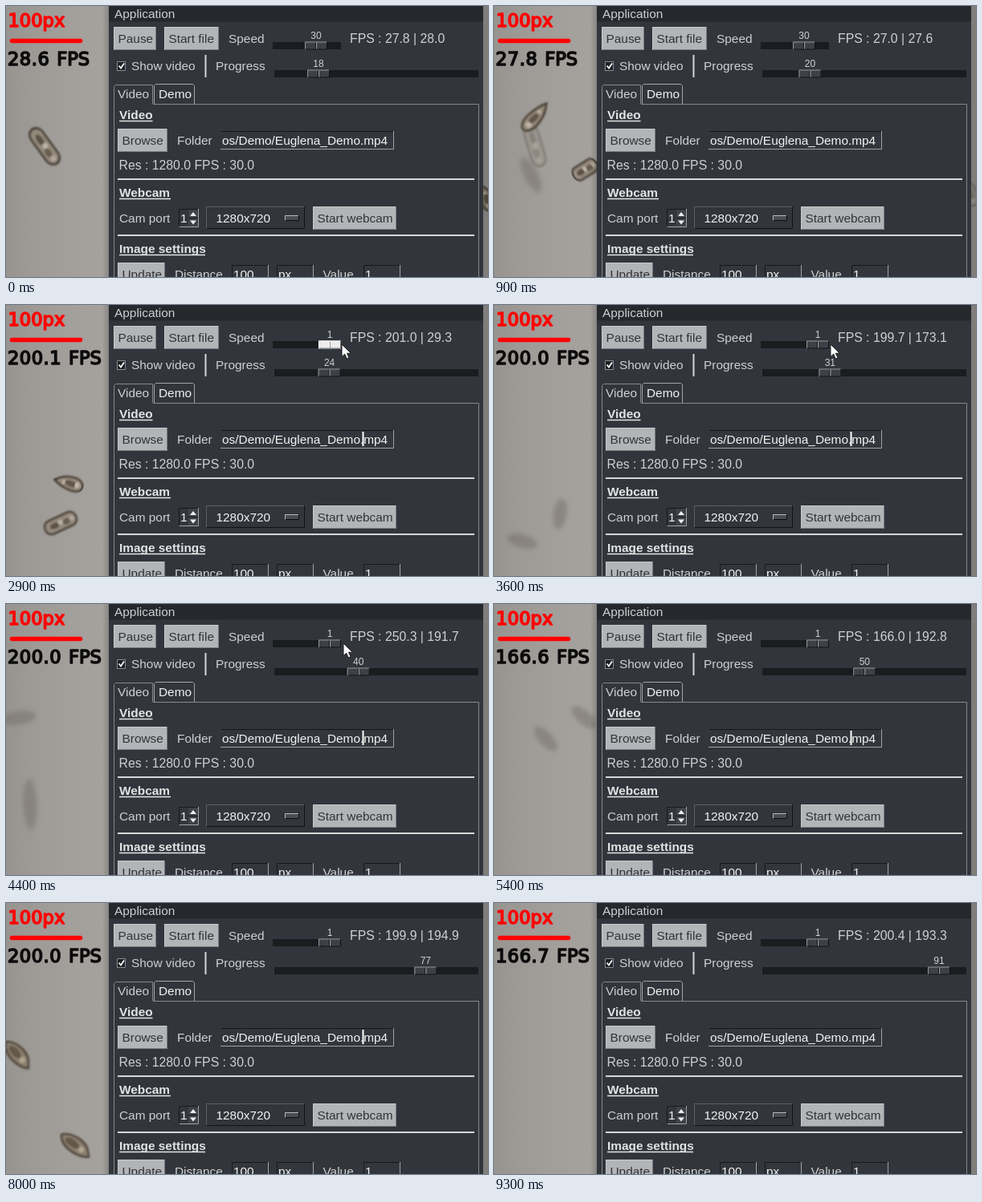
Recreate the animation shown at these times as an HTML page. Size 600 by 338 pixels, loop 9400 ms.

```html
<!DOCTYPE html>
<html lang="en">
<head>
<meta charset="utf-8">
<title>Video control panel</title>
<style>
html, body { margin: 0; width: 100%; height: 100%; overflow: hidden; background: #a09c98; }
svg { display: block; width: 100vw; height: 100vh; }
text { font: 15.4px "Liberation Sans", Arial, sans-serif; fill: #cfd0d2; white-space: pre; }
.head { font-weight: bold; fill: #e2e3e4; }
.dark { fill: #303338; }
.lit { fill: #f2f2f2; }
.num { font-size: 15.8px; }
.small { font-size: 12px; text-anchor: middle; }
.over { font: 22.6px "DejaVu Sans", sans-serif; fill: #0c0c0c; stroke: #0c0c0c; stroke-width: 1.6; stroke-linejoin: round; }
.red { fill: #f00; stroke: #f00; }
#rate { letter-spacing: .5px; }
</style>
</head>
<body>
<svg viewBox="0 0 600 338" preserveAspectRatio="none" xmlns="http://www.w3.org/2000/svg">
  <defs>
    <filter id="b1" x="-30%" y="-50%" width="160%" height="200%"><feGaussianBlur stdDeviation="1"/></filter>
    <filter id="b2" x="-50%" y="-80%" width="200%" height="260%"><feGaussianBlur stdDeviation="3"/></filter>
    <linearGradient id="edge"><stop offset="0" stop-opacity="0"/><stop offset="1" stop-opacity=".18"/></linearGradient>
    <linearGradient id="vig"><stop offset="0" stop-color="#565452" stop-opacity=".12"/><stop offset="1" stop-color="#fff" stop-opacity=".05"/></linearGradient>
    <clipPath id="entry"><rect x="268" y="156" width="214" height="21"/></clipPath>
    <g id="rod" filter="url(#b1)">
      <rect x="-25" y="-9" width="50" height="18" rx="9" fill="#94897a" stroke="#3f382f" stroke-width="3"/>
      <ellipse cx="-9" rx="8" ry="4" fill="#554b3f"/><ellipse cx="9" cy="1" rx="6" ry="4" fill="#62584a"/>
      <circle cy="-1" r="3.5" fill="#beb5a8"/><circle cx="18" r="3.5" fill="#b5aa9b"/>
    </g>
    <g id="drop" filter="url(#b1)">
      <path d="M-25 2C-18-3-8-9 8-9C20-9 26-4 25 1C23 7 12 9 2 8C-9 7-18 5-25 2Z" fill="#978b79" stroke="#40382e" stroke-width="3"/>
      <ellipse cx="4" rx="11" ry="4" fill="#5a5043"/><circle cx="15" cy="-1" r="4" fill="#c2b8aa"/><circle cx="-9" cy="1" r="3" fill="#b9ae9e"/>
    </g>
    <g id="spin" filter="url(#b1)">
      <path d="M-25-1C-17-10 5-13 17-6C21-3 23-1 26 2C17 9 6 10-6 9C-16 8-22 4-25-1Z" fill="#8a7e6c" stroke="#443b2f" stroke-width="2.8"/>
      <ellipse cx="-5" rx="12" ry="5" fill="#5d5242"/><circle cx="11" r="4" fill="#b3a892"/>
    </g>
    <g id="soft" filter="url(#b2)"><ellipse rx="24" ry="9" fill="#69655a"/></g>
  </defs>

  <rect id="bg" width="600" height="338" fill="#a09c98"/>
  <rect width="128" height="338" fill="url(#vig)"/>
  <g id="cells"></g>
  <rect x="120" width="8" height="338" fill="url(#edge)"/>
  <rect x="594" width="6" height="338" opacity=".2"/>

  <text class="over red" x="2.5" y="26">100px</text>
  <path d="M7.5 43.5H92.5" stroke="#f00" stroke-width="5.5" stroke-linecap="round"/>
  <text class="over" id="rate" x="2" y="73.5"></text>
  <text class="over" id="unit" y="73.5">FPS</text>

  <rect x="128" width="466" height="338" fill="#32363c"/>
  <rect x="128" width="466" height="19.5" fill="#25282d"/>
  <g id="ui"></g>

  <g id="speed"></g>
  <g id="prog"></g>
  <text class="small" id="speedNum" y="41"></text>
  <text class="small" id="progNum" y="75.5"></text>
  <text class="num" id="fps" x="428" y="46"></text>
  <path id="caret" d="M444.5 158V176" stroke="#fff" stroke-width="2"/>
  <path id="mouse" d="M0 0V15.5L3.7 12.2L6.2 18L9 16.8L6.5 11.2H11.4Z" fill="#fff" stroke="#1a1a1a"/>
</svg>
<script>
const $ = id => document.getElementById(id);
const LOOP = 9400, STEP = 100;
const FAST = 2.9; // seconds until the video runs at full speed
const clamp = v => Math.max(0, Math.min(1, v));
const frac = v => v - Math.floor(v);
const rand = n => frac(Math.abs(Math.sin(n * 127.1 + 11.7)) * 43758.5453);
const show = (el, on) => { el.style.display = on ? "" : "none"; };
const move = (el, x, y = 0) => el.setAttribute("transform", `translate(${x} ${y})`);

// Static widgets
const label = (x, y, s, cls = "") => `<text x="${x}" y="${y}" class="${cls}">${s}</text>`;
const box = (x, y, w, h, fill) => `<rect x="${x}" y="${y}" width="${w}" height="${h}" fill="${fill}"/>`;
const line = (d, color, w = 1) => `<path d="${d}" fill="none" stroke="${color}" stroke-width="${w}"/>`;
const bevel = (x, y, w, h, fill, top, low) => box(x, y, w, h, fill) +
  line(`M${x + .5} ${y + h}V${y + .5}H${x + w}`, top) +
  line(`M${x + .5} ${y + h - .5}H${x + w - .5}V${y}`, low);
const button = (x, y, w, s) =>
  bevel(x, y, w, 29, "#b3b4b7", "#c8c9cb", "#7b7d81") + label(x + 5.5, y + 19.5, s, "dark");
const entry = (x, y, w, s = "") =>
  bevel(x, y, w, 23, "#33373d", "#17191c", "#a0a2a5") + label(x + 2, y + 16.5, s, "lit");
const heading = (y, w, s) => label(141, y, s, "head") + line(`M141 ${y + 2.5}h${w}`, "#e2e3e4", 1.5);
const rule = y => line(`M139 ${y}H583`, "#d5d6d7", 2);
const trough = (x, y, w) => box(x, y, w, 9, "#1a1c1f");

$("ui").innerHTML = [
  label(135, 15, "Application"),
  button(134, 26, 53, "Pause"),
  button(197, 26, 68, "Start file"),
  label(277, 46, "Speed"),
  trough(332, 45, 85),
  bevel(138, 69, 11, 12, "#1d1f23", "#8b8e92", "#8b8e92"),
  line("M140.5 74.5L143 77.5L147 71.5", "#fff", 1.8),
  label(156, 80, "Show video"),
  line("M248.5 61V89", "#d5d6d7", 2),
  label(261, 80, "Progress"),
  trough(334, 80, 254),
  line("M134.5 338V100.5L136.5 98.5H182.5V122", "#85888c"),
  line("M184.5 122.5V99.5L186.5 97.5H232.5L234.5 99.5V122.5", "#a3a5a8"),
  line("M183 122.5H588.5V338", "#85888c"),
  label(139, 115, "Video"),
  label(190, 115, "Demo", "lit"),
  heading(141, 41.5, "Video"),
  button(139, 153, 62, "Browse"),
  label(213, 172.5, "Folder"),
  `<g clip-path="url(#entry)">${entry(267, 156, 216, "os/Demo/Euglena_Demo.mp4")}</g>`,
  line("M267 178.5H482.5V156", "#a0a2a5"),
  label(140.5, 203.5, "Res : 1280.0 FPS : 30.0", "num"),
  rule(216),
  heading(238, 64, "Webcam"),
  label(141, 270, "Cam port"),
  entry(215, 253, 25, "1"),
  box(227, 254, 12, 21, "#3f4348"),
  line("M227 264.5H239", "#16181b"),
  `<path d="M229 262L233 257L237 262ZM229 267.5L233 272.5L237 267.5Z" fill="#eee"/>`,
  bevel(249, 250, 123, 28, "#32363c", "#5c6065", "#121416"),
  label(261.5, 270, "1280x720", "lit"),
  bevel(347, 261, 18, 7, "#4a4e53", "#b5b7b9", "#0c0d0f"),
  button(382, 250, 104, "Start webcam"),
  rule(286),
  heading(308, 107, "Image settings"),
  button(139, 320, 59, "Update"),
  label(210, 339.5, "Distance"),
  entry(281, 323, 46, "100"),
  entry(337, 323, 46, "px"),
  label(394.5, 339.5, "Value"),
  entry(445, 323, 46, "1")
].join("");

const thumb = (y, hot) => hot
  ? bevel(-14, y, 28, 10, "#ededed", "#fff", "#777") + line(`M.5 ${y + 1}v8`, "#9a9a9a")
  : bevel(-14, y, 28, 10, "#3d4147", "#94979a", "#0e0f11") + line(`M-.5 ${y + 1}v8`, "#0e0f11") + line(`M.5 ${y + 1}v8`, "#a5a7aa");
$("prog").innerHTML = thumb(79.5, false);

// Cells: kind, x, y, angle, length, time in focus
const cells = [
  ["rod", 48, 175, 54, 52, 0],
  ["drop", 598, 239, 70, 34, 0],
  ["drop", 53, 142, 137, 43, 1.7],
  ["rod", 112, 200, -24, 33, 1.7],
  ["soft", 41, 212, 50, 50, 1.7],
  ["drop", 78, 222, 20, 36, FAST],
  ["rod", 68, 272, -25, 42, FAST],
  ["soft", 15, 142, -8, 46, 4.4],
  ["soft", 30, 250, 88, 66, 4.4],
  ["soft", 95, 214, 50, 44, 6.5],
  ["spin", 14, 189, 47, 42, 8],
  ["spin", 86, 302, 36, 43, 8]
];
for (let i = 0; i < 8; i++) {
  const at = 3.6 + 1.7 * (i >> 1);
  cells.push(["soft", rand(i) * 120, 100 + rand(i + 10) * 220, rand(i + 20) * 180, 40, at]);
}
const nodes = cells.map(c => {
  const u = document.createElementNS("http://www.w3.org/2000/svg", "use");
  u.setAttribute("href", "#" + c[0]);
  $("cells").appendChild(u);
  return u;
});

// Cells drift, turn and fade around their time; faster playback shortens each visit
function drawCells(t) {
  cells.forEach(([kind, x, y, angle, len, at], i) => {
    const d = t - at, span = at < FAST ? .95 : .42, speed = at < FAST ? 16 : 50;
    const fade = clamp((span - Math.abs(d)) / .15), u = nodes[i];
    show(u, fade > 0);
    const drift = k => (rand(i + k) - .5) * d;
    u.setAttribute("opacity", fade * (kind === "soft" ? .4 : .92));
    u.setAttribute("transform", `translate(${x + drift(50) * speed} ${y + drift(80) * speed}) ` +
      `rotate(${angle + drift(30) * 60}) scale(${len / 50} .95)`);
  });
}

// Pointer key points: time, x, y, eased between
const path = [[1, 606, 150], [1.7, 511, 91], [2.3, 389, 49], [2.5, 389, 49], [2.85, 418, 49], [4.4, 420, 49], [5, 606, 130]];
function pointer(t) {
  const i = Math.max(1, path.findIndex(p => p[0] > t));
  const [t0, x0, y0] = path[i - 1], [t1, x1, y1] = path[i];
  const k = clamp((t - t0) / (t1 - t0)), e = k * k * (3 - 2 * k);
  return [x0 + (x1 - x0) * e, y0 + (y1 - y0) * e];
}

const progress = t => Math.round(t < FAST ? 18.1 + 1.76 * t : 24 + 10.4 * (t - FAST));
const average = t => t < FAST ? 28 - .47 * t
  : 194 - 165.7 * Math.exp(-2.9 * (t - FAST)) + 1.05 * Math.sin(1.4 * (t - 6.5));

// Frame rates for the overlay and the label, from whole milliseconds per frame
function rates(step, speed) {
  if (speed > 1) {
    const ms = speed + 5 + step % 2;
    return [1000 / ms, 1000 / (ms + 1)];
  }
  const q = frac(step * .18);
  const over = q > .6 && q < .85 ? 6 : 5;
  const now = q > .85 ? 4 : q > .6 && q < .72 ? 6 : 5;
  const noise = (rand(step) - .5) / 100;
  return [1000 / over * (1 + noise / 8), 1000 / now * (1 + noise)];
}

function draw(ms) {
  const step = Math.floor((ms % LOOP) / STEP), t = step * STEP / 1000;
  const [mx, my] = pointer(Math.min(t, 4.99));
  drawCells(t);

  const drag = t < 2.5 ? 0 : Math.min(17, mx - 389), sx = 386 + drag;
  const speed = t > 4.4 ? 1 : Math.round(30 - drag * 29 / 17);
  $("speed").innerHTML = thumb(44.5, t >= 2.2 && t <= 3);
  move($("speed"), sx);
  $("speedNum").setAttribute("x", sx);
  $("speedNum").textContent = speed;

  const p = progress(t), px = 389 + (p - 18) * 2.26;
  move($("prog"), px);
  $("progNum").setAttribute("x", px);
  $("progNum").textContent = p;

  const [over, now] = rates(step, speed), rate = over.toFixed(1);
  $("rate").textContent = rate;
  $("unit").setAttribute("x", rate.length > 4 ? 78 : 63.2);
  $("fps").textContent = `FPS : ${now.toFixed(1)} | ${average(t).toFixed(1)}`;

  show($("caret"), t > 2.35 && (t - 2.35) % .9 < .6);
  show($("mouse"), t >= 1 && t < 5);
  move($("mouse"), mx, my);
}

const start = performance.now();
function tick() {
  draw(performance.now() - start);
  requestAnimationFrame(tick);
}
draw(0);
requestAnimationFrame(tick);
</script>
</body>
</html>
```
